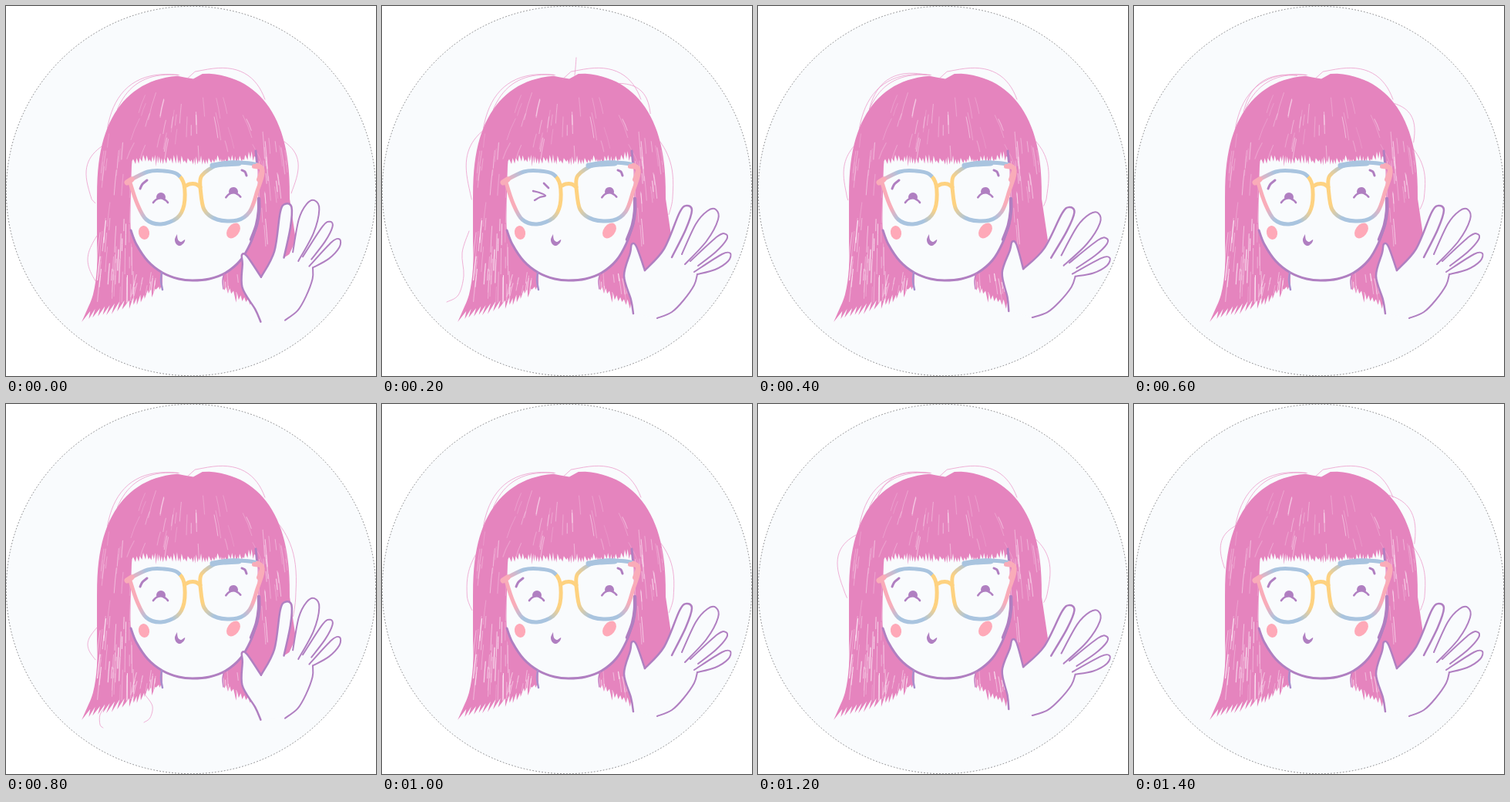
Animation, 480 px wide and 480 px high, one loop 1600 ms. Source, as an HTML page with a canvas:

```html
<!DOCTYPE html>
<html lang="en">
<head>
<meta charset="utf-8">
<title>Waving hello</title>
<style>
html, body { margin: 0; width: 100%; height: 100%; overflow: hidden; background: #fff; }
canvas { display: block; width: 480px; height: 480px; }
</style>
</head>
<body>
<canvas id="stage" width="480" height="480"></canvas>
<script>
const ctx = document.getElementById('stage').getContext('2d');
const PAPER = '#f9fbfd', HAIR = '#e584be', PURPLE = '#b07fc1', BLUSH = '#fea9b8';
const PINK = '#f9acb9', BLUE = '#a9c4df', GOLD = '#fed280';
const STEP = 200, COUNT = 8, RAD = Math.PI / 180;

let seed;
const rnd = () => (seed = (seed * 16807) % 2147483647) / 2147483647;
const span = (a, b) => a + (b - a) * rnd();
const points = s => s.split(' ').map(p => p.split(',').map(Number));

// Smooth curve through the given points.
function spline(path, text, join) {
  const p = points(text), n = p.length;
  path[join ? 'lineTo' : 'moveTo'](...p[0]);
  for (let i = 0; i < n - 1; i++) {
    const a = p[Math.max(0, i - 1)], b = p[i], c = p[i + 1], d = p[Math.min(n - 1, i + 2)];
    path.bezierCurveTo(b[0] + (c[0] - a[0]) / 6, b[1] + (c[1] - a[1]) / 6,
      c[0] - (d[0] - b[0]) / 6, c[1] - (d[1] - b[1]) / 6, c[0], c[1]);
  }
  return path;
}

function line(text, width, color = PURPLE) {
  ctx.lineWidth = width;
  ctx.strokeStyle = color;
  ctx.stroke(spline(new Path2D(), text));
}

// Outer edge of the hair: a squarish dome, then straight sides beyond 0 and 180 degrees.
function rim(deg, lift = 0) {
  const a = Math.min(180, Math.max(0, deg)) * RAD, c = Math.cos(a), right = c > 0;
  const x = 243 + Math.sign(c) * (125 + lift) * Math.abs(c) ** 0.8;
  const drop = Math.max(0, -deg, deg - 180) * 2;
  const notch = 8 * Math.exp(-(((x - 241) / 9) ** 2)) * (lift ? 0 : 1);
  const y = 250 - ((right ? 163 : 160) + lift) * Math.sin(a) ** 0.8 + notch + drop;
  return [x + (right ? drop * 0.12 : 0), y];
}

// Uneven locks along a straight edge, leaning to one side.
function locks(path, x0, y0, x1, y1, n, depth, lean) {
  for (let i = 0; i < n; i++) {
    const k = (i + span(0.1, 0.5)) / n, e = (i + 1) / n, d = depth * rnd();
    path.lineTo(x0 + (x1 - x0) * k + lean * d, y0 + (y1 - y0) * k + d);
    path.lineTo(x0 + (x1 - x0) * e, y0 + (y1 - y0) * e - span(0, depth / 3));
  }
}

function backdrop() {
  ctx.fillStyle = '#fff';
  ctx.fillRect(0, 0, 480, 480);
  ctx.beginPath();
  ctx.arc(240, 240, 239.7, 0, 7);
  ctx.fillStyle = PAPER;
  ctx.fill();
  ctx.setLineDash([1, 3]);
  ctx.lineWidth = 0.7;
  ctx.strokeStyle = 'rgba(25,25,30,.7)';
  ctx.stroke();
  ctx.setLineDash([]);
}

// Light gaps between brush strokes inside a box; flare bends them away from its axis.
function streaks(n, x0, x1, y0, y1, long, alpha, axis, flare) {
  for (let i = 0; i < n; i++) {
    const x = span(x0, x1), y = span(y0, y1), len = span(long / 3, long);
    const dx = (x - axis) * len * flare;
    ctx.beginPath();
    ctx.moveTo(x, y);
    ctx.quadraticCurveTo(x + dx * 0.65, y + len / 2, x + dx, y + len);
    ctx.lineWidth = span(0.5, 1.3);
    ctx.strokeStyle = `rgba(253,240,248,${alpha * span(0.4, 1)})`;
    ctx.stroke();
  }
}

function hair() {
  seed = 4127;
  const h = new Path2D();
  h.moveTo(376, 304);
  for (let a = 0; a <= 180; a += 3) h.lineTo(...rim(a));
  spline(h, '118,250 118,300 118,340 113,374 103,399', true);
  locks(h, 103, 399, 160, 384, 9, 13, -0.5);
  locks(h, 160, 384, 203, 363, 9, 12, -0.2);
  h.lineTo(203, 340);
  h.lineTo(281, 340);
  locks(h, 281, 366, 328, 388, 10, 13, 0.15);
  h.lineTo(345, 370);
  h.closePath();
  ctx.fillStyle = HAIR;
  ctx.fill(h);
  ctx.save();
  ctx.clip(h);
  streaks(34, 165, 320, 112, 182, 36, 0.6, 241, 0.006);
  streaks(16, 125, 165, 165, 260, 40, 0.55, 190, 0.002);
  streaks(40, 121, 166, 270, 365, 40, 0.9, 160, 0.003);
  streaks(28, 325, 364, 160, 290, 36, 0.75, 310, 0.003);
  streaks(14, 165, 201, 345, 370, 20, 0.8, 210, 0.006);
  streaks(14, 283, 322, 345, 372, 20, 0.8, 270, 0.004);
  ctx.restore();
}

function face() {
  seed = 911;
  const jaw = '162,291 169,309 184,331 203,346 224,354 242,356 264,354 285,346 304,330 317,308 326,282';
  const f = spline(new Path2D(), '163,207 162,245 ' + jaw + ' 327,250 326,197');
  for (let x = 322; x > 165; x -= span(2.5, 5)) {
    const y = 201 - Math.max(0, x - 295) * 0.22;
    f.lineTo(x, y - span(0, 9));
    f.lineTo(x - 1.5, y + span(0, 7));
  }
  f.closePath();
  ctx.fillStyle = PAPER;
  ctx.fill(f);
  line(jaw, 3);
  line('328,250 328,266 325,284 318,303', 4.5);
  line('324,188 325,198 326,208', 3);
  line('202,346 201,356 203,368', 2.5, '#a88fcd');
  line('283,347 281,356 282,367', 1.6, '#c67fc2');

  ctx.fillStyle = BLUSH;
  for (const [x, y, rx, ry, a] of [[179, 294, 7, 9, -0.2], [295, 291.5, 7.5, 11, 0.65]]) {
    ctx.beginPath();
    ctx.ellipse(x, y, rx, ry, a, 0, 7);
    ctx.fill();
  }
  ctx.fillStyle = PURPLE;
  ctx.fill(spline(new Path2D(), '222,296 219,303 221,309 226,311 231,307 232,303 227,306 223,303 222,296'));
}

function eye(x, y, tilt) {
  ctx.save();
  ctx.translate(x, y);
  ctx.rotate(tilt);
  ctx.fillStyle = PURPLE;
  ctx.beginPath();
  ctx.arc(0, 0, 6, 2.75, 6.7);
  ctx.quadraticCurveTo(0, 2, -5.5, 3);
  ctx.fill();
  line('-10,7 -6,3 0,1 6,4 9,7', 2.6);
  ctx.restore();
}

function eyes(wink) {
  if (wink) {
    line('196,240 204,242 212,246 205,248 198,252', 2.4);
    line('210,230 216,236', 2.6);
  } else {
    eye(201, 248, 0);
    line('174,237 177,231 183,226', 3);
  }
  eye(295, 241, -0.04);
  line('306,213 310,215 312,220', 3);
}

// Frame colours turn around the lens: inner, bottom, outer, top.
function lens(x, y, text, colors) {
  const g = ctx.createConicGradient(-Math.PI / 4, x, y);
  colors.forEach((c, i) => {
    g.addColorStop(i / 4 + 0.05, c);
    g.addColorStop(i / 4 + 0.2, c);
  });
  line(text, 5, g);
}

function glasses() {
  lens(199, 248, '157,228 184,215 205,214 222,218 231,232 231,258 222,275 201,283 182,277 170,256 160,226',
    [GOLD, BLUE, PINK, BLUE]);
  lens(288, 241, '252,236 254,220 275,206 300,203 332,210 325,243 316,267 300,278 274,277 257,264 252,236',
    [PINK, BLUE, GOLD, BLUE]);
  line('268,207 282,205 302,204', 7, BLUE);
  line('322,208 332,211 328,225', 6, PINK);
  line('157,229 163,225', 7, PINK);
  line('232,234 238,231 246,231 252,235', 5, GOLD);
}

// Side of the palm, thumb, four fingers, wrist.
const hand = [
  '326,399 323,381 314,350 322,320 324,309 330,312 341,343',
  '341,343 366,315 386,268 395,259 402,265 394,290 376,326',
  '389,322 407,283 422,266 433,264 436,277 421,305 393,335',
  '400,331 435,299 446,296 447,303 433,319 410,337',
  '405,345 441,322 452,321 449,331 432,342 409,348',
  '409,348 405,362 391,382 376,397 357,405'
];
const swing = [-14.5, 0, 4, 0];

function wave(deg) {
  ctx.save();
  ctx.translate(370, 387);
  ctx.rotate(deg * RAD);
  ctx.translate(-370, -387);
  const shape = new Path2D();
  hand.forEach((p, i) => spline(shape, p, i > 0));
  ctx.fillStyle = PAPER;
  ctx.fill(shape);
  hand.forEach((p, i) => line(p, i < 2 ? 2.5 : 2));
  ctx.restore();
}

// Loose hairs: from angle, to angle, lift off the rim.
const still = [[92, 45, 12], [150, 93, 9], [138, 93, 6]];
const loose = [
  [[160, 184, 15], [22, 0, 13], [204, 235, 12]],
  [[152, 182, 11], [22, -12, 10], [64, 36, 9]],
  [[138, 95, 11], [160, 182, 8], [22, -6, 10]],
  [[140, 98, 10], [45, 20, 10], [18, -8, 10]],
  [[30, -15, 9], [200, 222, 12]],
  [[165, 190, 8], [20, -12, 11]],
  [[155, 182, 17], [130, 95, 8], [22, -5, 12]],
  [[150, 172, 11], [50, 18, 11], [18, -10, 10]]
];
const tails = {
  1: ['252,67 251,80 250,90', '113,292 104,320 106,350 99,375 84,384'],
  4: ['181,378 190,392 187,407 179,413', '130,391 122,403 122,416 126,420']
};

function strays(i) {
  const tint = '#eb97c9';
  ctx.lineWidth = 0.75;
  ctx.strokeStyle = tint;
  for (const [a, b, lift] of [...still, ...loose[i]]) {
    ctx.beginPath();
    for (let k = 0; k <= 1; k += 0.05) ctx.lineTo(...rim(a + (b - a) * k, lift * Math.sin(Math.PI * k)));
    ctx.stroke();
  }
  for (const t of tails[i] || []) line(t, 0.75, tint);
}

function draw(i) {
  ctx.lineCap = ctx.lineJoin = 'round';
  backdrop();
  hair();
  face();
  eyes(i === 1);
  glasses();
  strays(i);
  wave(swing[i % swing.length]);
}

const start = performance.now();
let shown = -1;
function tick() {
  const i = Math.floor((performance.now() - start) / STEP) % COUNT;
  if (i !== shown) draw(shown = i);
  requestAnimationFrame(tick);
}
tick();
</script>
</body>
</html>
```
